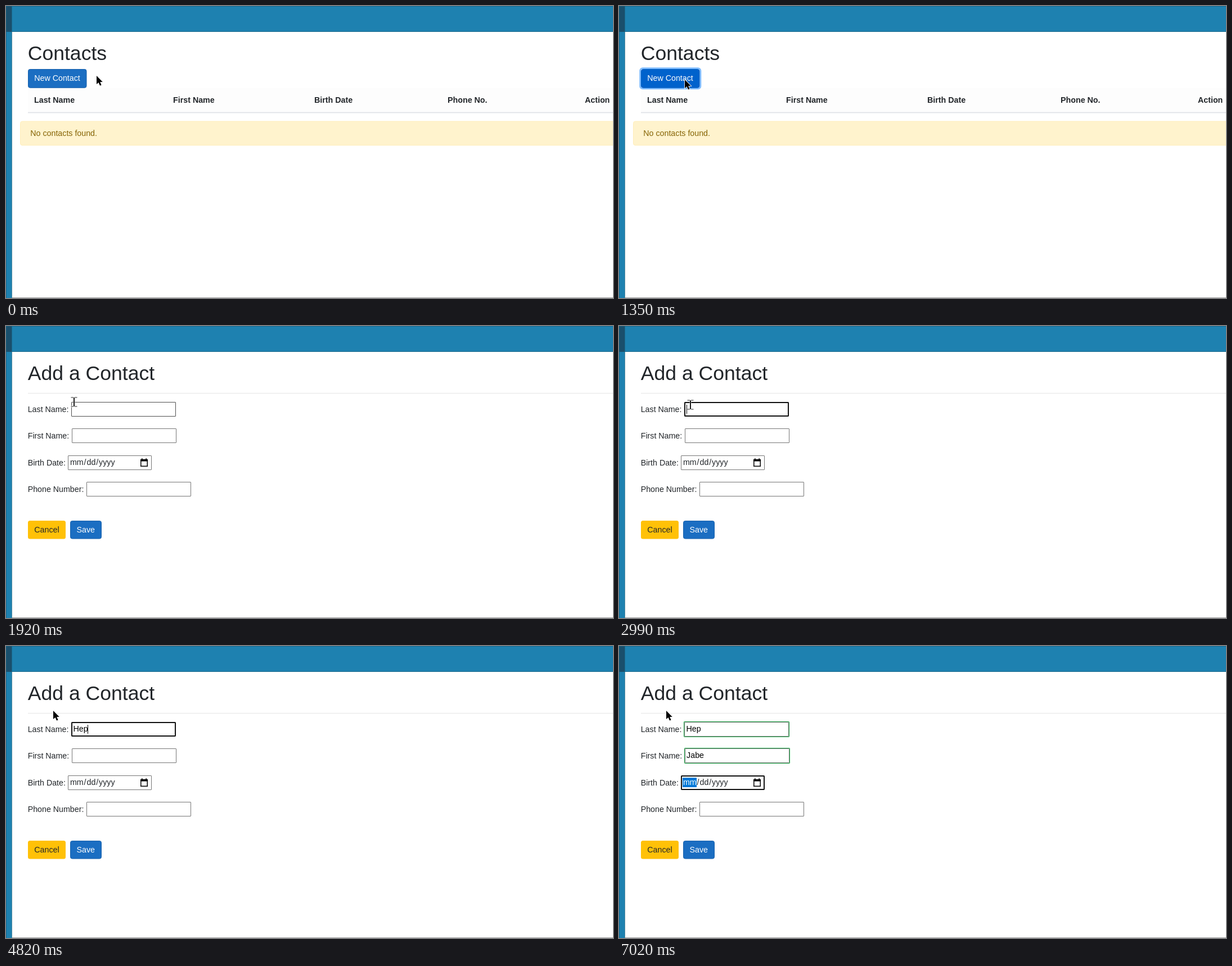
These frames come from a looping animation (1079 px wide and 519 px high, 8000 ms). An HTML page:

```html
<!DOCTYPE html>
<html lang="en">
<head>
<meta charset="utf-8">
<title>Contacts</title>
<style>
  html, body { margin: 0; width: 100%; height: 100%; overflow: hidden; background: #fff; }
  svg { display: block; width: 100%; height: 100%; }
  text { font: 14.24px "Liberation Sans", Arial, sans-serif; fill: #212529; white-space: pre; }
  .h1 { font-size: 35.6px; }
  .th { font-weight: bold; }
  .light { fill: #fff; }
  .typed { fill: #000; }
  .box { fill: #fff; stroke: #767676; }
  .ring { fill: none; stroke: #101010; stroke-width: 2; }
  .valid { fill: none; stroke: #26b050; }
</style>
</head>
<body>
<svg viewBox="0 0 1079 519">
  <rect width="1079" height="519" fill="#fff"/>
  <g id="frame">
    <rect width="1079" height="46" fill="#1e81b0"/>
    <rect y="46" width="10" height="473" fill="#1e81b0"/>
    <rect width="10" height="46" fill="#1a4f6c"/>
    <path d="M0 .5H1079M10 45.5H1079M.5 0V519M10.5 0V519" stroke="#17607f" stroke-opacity=".75" fill="none"/>
    <path d="M11 518.5H1079" stroke="#999"/>
  </g>

  <g id="list">
    <text class="h1" x="38.7" y="96">Contacts</text>
    <rect x="39" y="146" width="1040" height="43" fill="#fdfdfd"/>
    <rect x="39" y="188.6" width="1040" height="1.7" fill="#dee2e6"/>
    <rect id="glow" x="37.6" y="110.6" width="107.3" height="36.3" rx="4.5" fill="none" stroke="#80bdff" stroke-width="2.8"/>
    <rect id="add" x="39.5" y="112.5" width="103.5" height="32.8" rx="3.2"/>
    <text class="light" x="50.3" y="133">New Contact</text>
    <text class="th" x="50.1" y="172">Last Name</text>
    <text class="th" x="297.1" y="172">First Name</text>
    <text class="th" x="548.1" y="172">Birth Date</text>
    <text class="th" x="785.1" y="172">Phone No.</text>
    <text class="th" x="1029" y="172">Action</text>
    <rect x="25.5" y="205" width="1070" height="42.6" rx="3.5" fill="#fff3cd" stroke="#ffeeba"/>
    <text x="43.3" y="231" style="fill:#856404">No contacts found.</text>
  </g>

  <g id="form">
    <text class="h1" x="38.7" y="96">Add a Contact</text>
    <path d="M39 119.5H1079" stroke="#e5e5e5"/>
    <text x="38.7" y="152.5">Last Name:</text>
    <text x="38.7" y="200">First Name:</text>
    <text x="38.7" y="247.7">Birth Date:</text>
    <text x="38.7" y="295.2">Phone Number:</text>
    <g id="fields"></g>
    <rect id="mark" x="113" y="234" width="25" height="17" fill="#0078d7"/>
    <text id="month" x="114" y="247.2">mm</text>
    <text x="138.6" y="247.2">/</text>
    <text x="143.5" y="247.2">dd</text>
    <text x="160.2" y="247.2">/</text>
    <text x="165.1" y="247.2">yyyy</text>
    <path d="M239.8 237.5H251.2V249.3H239.8Z" fill="none" stroke="#000" stroke-width="1.5"/>
    <path d="M239 237H252V240.6H239ZM241 235.2H242.6V238H241ZM248.4 235.2H250V238H248.4Z"/>
    <text id="last" class="typed" x="119.6" y="151.6"></text>
    <text id="first" class="typed" x="120.1" y="199.3"></text>
    <rect id="caret" width="1" height="16"/>
    <rect x="39" y="346" width="67" height="32.5" rx="3.5" fill="#ffc107"/>
    <text x="50.3" y="367">Cancel</text>
    <rect x="114.5" y="346.5" width="55" height="31.5" rx="3.2" fill="#1b6ec2" stroke="#1861ac"/>
    <text class="light" x="125.6" y="367">Save</text>
  </g>

  <path id="arrow" d="M0 0V15L3.5 11.9 6 17.6 8.6 16.5 6.2 11H10.8Z" stroke="#fff" stroke-width="1.6" paint-order="stroke"/>
  <g id="beam" fill="none">
    <path d="M-6 -8H6M-6 8H6M0 -9V9" stroke="#fff" stroke-width="3" stroke-opacity=".9"/>
    <path d="M-5.5 -8H-1.5L0 -7 1.5 -8H5.5M-5.5 8H-1.5L0 7 1.5 8H5.5" stroke="#222"/>
    <path d="M0 -7V7" stroke="#000" stroke-width="1.8"/>
  </g>
</svg>
<script>
const LOOP = 8000, BLINK = 525;
const OPEN = 1380, HOVER = 560, CLICK = 1190, OVER = 1590, LEAVE = 4625;
const FOCUS = [1925, 5285, 7020];

// Pointer hotspot: time, x, y
const PATH = [
  [430, 161, 124], [530, 153, 133], [620, 138, 136], [700, 122, 134], [760, 117, 131],
  [1340, 117, 131], [1380, 118, 132], [1560, 118, 132], [1590, 122, 135], [1710, 124, 137],
  [1890, 122, 135], [1990, 119, 134], [2170, 127, 140],
  [4545, 127, 140], [4820, 84, 115]
];
const BOXES = [[116, 135, 186], [117, 182, 186], [110, 230, 149], [143, 277, 186]];
const NAMES = [
  { id: "last", word: "Hep", keys: [3040, 3210, 3590], x: 119.6, y: 140 },
  { id: "first", word: "Jabe", keys: [5980, 6190, 6350, 6450], x: 120.1, y: 187 }
];

const $ = id => document.getElementById(id);
const show = (el, on) => el.style.display = on ? "" : "none";
const clamp = v => Math.max(0, Math.min(1, v));
const mix = (a, b, k) => `rgb(${a.map((v, i) => Math.round(v + (b[i] - v) * k))})`;

function rect(cls, x, y, w, h, rx) {
  const el = document.createElementNS("http://www.w3.org/2000/svg", "rect");
  el.setAttribute("class", cls);
  Object.entries({ x, y, width: w, height: h, rx }).forEach(([k, v]) => el.setAttribute(k, v));
  return $("fields").appendChild(el);
}

const fields = BOXES.map(([x, y, w]) => ({
  box: rect("box", x + .5, y + .5, w - 1, 25, .5),
  ring: rect("ring", x + 1, y + 1, w - 2, 24, 1.2),
  valid: rect("valid", x - .5, y - .5, w + 1, 27, .5)
}));

function pointer(t) {
  const i = PATH.findIndex(p => p[0] > t);
  if (i < 0) return PATH[PATH.length - 1].slice(1);
  if (i === 0) return PATH[0].slice(1);
  const [t0, x0, y0] = PATH[i - 1], [t1, x1, y1] = PATH[i];
  const k = (t - t0) / (t1 - t0);
  return [x0 + (x1 - x0) * k, y0 + (y1 - y0) * k];
}

function drawButton(t) {
  const hover = clamp((t - HOVER) / 150), press = clamp((t - CLICK) / 150);
  $("add").setAttribute("fill", mix([27, 110, 194], [0, 98, 204], hover));
  $("add").setAttribute("stroke", mix([24, 97, 172], [0, 92, 191], hover));
  $("glow").style.opacity = press;
}

function drawForm(t) {
  const active = FOCUS.filter(f => t >= f).length - 1;
  fields.forEach((f, i) => {
    show(f.ring, i === active);
    show(f.valid, i < active);
  });
  fields[0].box.style.stroke = t >= OVER && t < LEAVE ? "#4f4f4f" : "";

  NAMES.forEach((n, i) => {
    const count = n.keys.filter(k => t >= k).length;
    const el = $(n.id);
    el.textContent = n.word.slice(0, count);
    if (i !== active) return;
    const since = t - (count ? n.keys[count - 1] : FOCUS[i]);
    $("caret").setAttribute("x", Math.floor(n.x + (count ? el.getComputedTextLength() : .4)));
    $("caret").setAttribute("y", n.y);
    show($("caret"), Math.floor(since / BLINK) % 2 === 0);
  });
  if (!NAMES[active]) show($("caret"), false);
  show($("mark"), active === 2);
  $("month").style.fill = active === 2 ? "#fff" : "";
}

function draw(t) {
  const open = t >= OPEN, beam = t >= OVER && t < LEAVE;
  show($("list"), !open);
  show($("form"), open);
  if (open) drawForm(t); else drawButton(t);
  const [x, y] = pointer(t).map(Math.round);
  show($("arrow"), !beam);
  show($("beam"), beam);
  $(beam ? "beam" : "arrow").setAttribute("transform", `translate(${x} ${y})`);
}

const start = performance.now();
function tick() {
  draw((performance.now() - start) % LOOP);
  requestAnimationFrame(tick);
}
tick();
</script>
</body>
</html>
```
